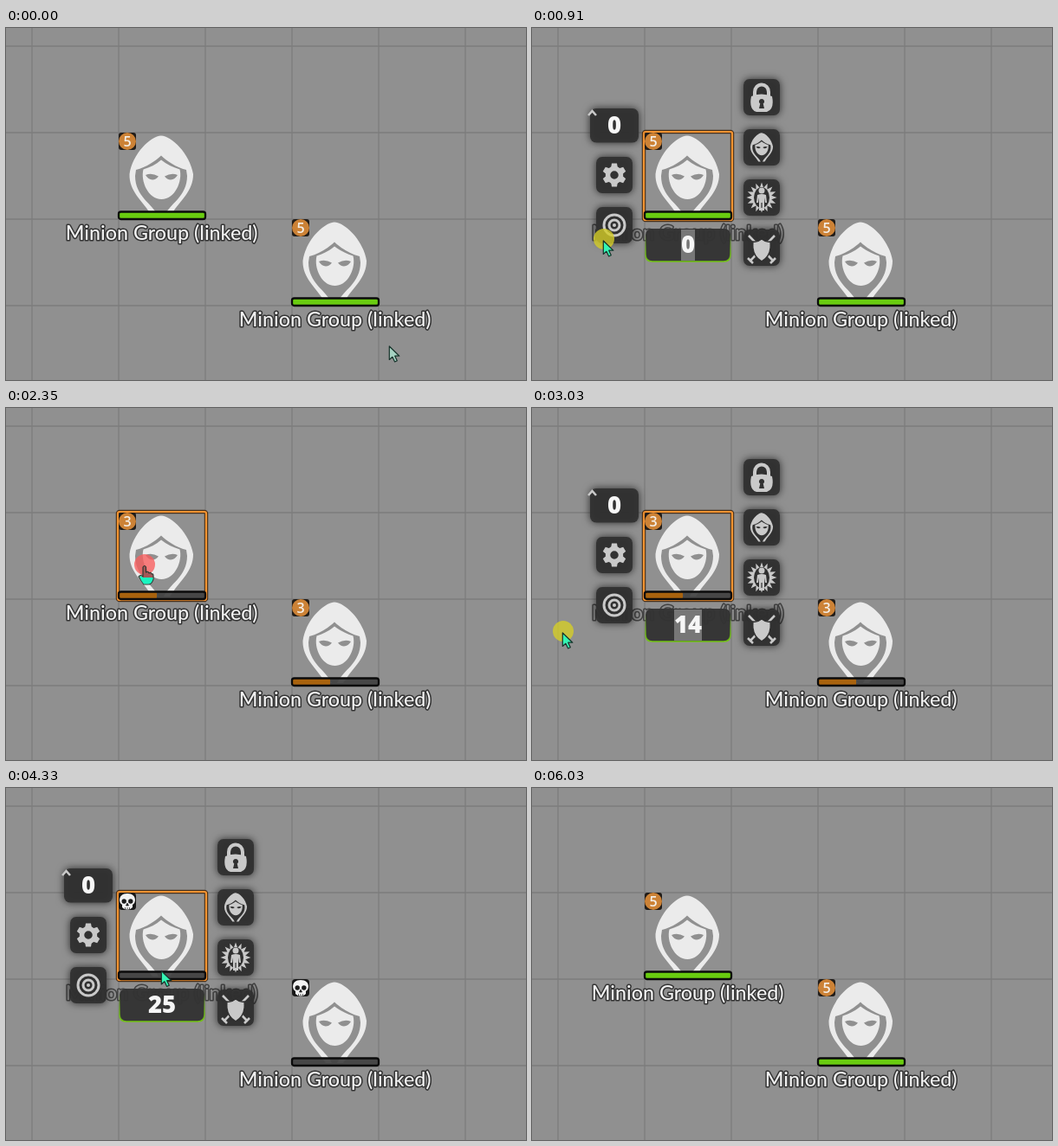
Recreate the animation shown at these times as an HTML page. Size 600 by 407 pixels, loop 6300 ms.

```html
<!DOCTYPE html>
<html lang="en">
<head>
<meta charset="utf-8">
<title>Minion group tokens</title>
<style>
html, body { margin: 0; width: 100%; height: 100%; overflow: hidden; background: #909090; }
svg { display: block; width: 600px; height: 407px; }
text { text-anchor: middle; }
.label { font: 500 23.3px Lato, sans-serif; fill: #f2f2f2; stroke: #333; stroke-width: 3px; stroke-linejoin: round; paint-order: stroke; }
.label.dim { fill: #8b8b8b; stroke: #343434; opacity: .85; }
.num { font: 800 27.5px "Open Sans", sans-serif; fill: #f6f6f6; }
.count { font: 600 16px "Open Sans", sans-serif; fill: #f4efe8; }
.btn { fill: #303030; fill-opacity: .93; filter: url(#shade); }
.icon { fill: #c9c9c9; }
.line { fill: none; stroke: #c9c9c9; }
</style>
</head>
<body>
<svg id="stage" viewBox="0 0 600 407" xmlns="http://www.w3.org/2000/svg">
  <defs>
    <filter id="shade" x="-50%" y="-50%" width="200%" height="200%">
      <feDropShadow dx="0" dy="0" stdDeviation="5" flood-color="#000" flood-opacity=".75"/>
    </filter>
    <linearGradient id="rim" x1="0" y1="0" x2="0" y2="1">
      <stop offset="0" stop-color="#6dbd10" stop-opacity="0"/>
      <stop offset=".5" stop-color="#6dbd10" stop-opacity=".55"/>
      <stop offset="1" stop-color="#72c412"/>
    </linearGradient>
    <path id="hood" fill-rule="evenodd" d="M49 3.500C37 4 16 24 12.500 48C12 68 27 78 36 93L39 97H46C39 82 19 74 19 50L20 43C32 40 42 33 49 26.500C56 33 66 40 78 43L79 50C79 74 59 82 52 97H59L62 93C71 78 86 68 86 48C82 24 61 4 49 3.500ZM49 31.500C43 37 36 40 28.500 42.500C25 56 34 77 49.500 77C65 77 74 56 70.500 42.500C63 40 56 37 49 31.500ZM31 49Q38 46 46 50.500Q43 54.500 39 54.500Q34 54 31 49ZM68 49Q61 46 53 50.500Q56 54.500 60 54.500Q65 54 68 49Z"/>
    <g id="skull">
      <rect x="0" y="0" width="20" height="20" rx="4" fill="#171717"/>
      <path fill="#f2f2f2" d="M10 1C4 1 1 4 1 9Q1 12 4 14V17Q7 20 10 19.500Q13 20 16 17V14Q19 12 19 9C19 4 16 1 10 1Z"/>
      <circle cx="6.200" cy="10" r="2.700" fill="#1a1a1a"/><circle cx="13.800" cy="10" r="2.700" fill="#1a1a1a"/>
      <path d="M10 12l-1.500 3h3zM7.500 17v2M10 17v2M12.500 17v2" fill="#1a1a1a" stroke="#1a1a1a" stroke-width=".7"/>
    </g>
  </defs>
  <rect width="600" height="407" fill="#909090"/>
  <path id="grid" stroke="#000" stroke-opacity=".14" stroke-width="1.300"/>
  <g id="tokens"></g>
  <g id="hud">
    <g id="buttons"></g>
    <path class="line" stroke-width="2.600" d="M65 101l4.500-5 4.500 5"/>
    <text class="num" x="95" y="122">0</text>
    <g id="gear" class="icon" transform="translate(95 170)"></g>
    <g transform="translate(95 228)">
      <circle class="line" r="12" stroke-width="3"/><circle class="line" r="6" stroke-width="3"/><circle class="icon" r="2"/>
    </g>
    <path class="line" stroke-width="4" d="M257 80v-6a8 8.500 0 0 1 16 0v6"/>
    <path class="icon" fill-rule="evenodd" d="M253 79Q265 74 277 79Q280 94 271 97H259Q250 94 253 79ZM265 82a3 3 0 0 0-1.700 5.500L262 93h6l-1.300-5.500A3 3 0 0 0 265 82Z"/>
    <use href="#hood" class="icon" transform="translate(247.500 120) scale(.355)"/>
    <g transform="translate(265 196)">
      <path id="aura" class="icon"/>
      <ellipse rx="9" ry="12" fill="#303030"/>
      <circle class="icon" cy="-8" r="3.500"/>
      <path class="icon" d="M-5-3Q0-5 5-3L6 6H4L3 0V15H.6V6H-.6V15H-3V0L-4 6H-6Z"/>
    </g>
    <g transform="translate(265 255)">
      <path class="line" stroke-width="2.600" d="M-15-15L14 15M15-15L-14 15M-16 11l6 6M16 11l-6 6"/>
      <path class="icon" stroke="#303030" stroke-width="1.500" d="M0-11Q5-7 10-8Q12 8 0 15Q-12 8-10-8Q-5-7 0-11Z"/>
    </g>
    <rect x="131" y="232" width="98" height="38" rx="7" fill="#323232" fill-opacity=".96"/>
    <path d="M131 238v24q0 8 8 8h82q8 0 8-8v-24" fill="none" stroke="url(#rim)" stroke-width="1.700"/>
    <rect id="pick" y="233" height="36" fill="#777"/>
    <text id="value" class="num" x="180" y="260"></text>
    <path id="caret" stroke="#fff" stroke-width="1.200"/>
  </g>
  <g id="pointer">
    <circle id="press" cy="-2" r="12"/>
    <path id="arrow" stroke="#17332b" stroke-width="1.200" stroke-linejoin="round" d="M-.7 0V15.500L2.900 12.300L5.600 18L8.300 16.700L5.700 11.200H10.800Z"/>
    <g id="hand" stroke="#26352f" stroke-width="1.100" stroke-linejoin="round">
      <path fill="#a35757" d="M-2 1Q0-2 1.500 1V7Q4 5 5 8Q7 6 8 9Q10 8 10 11V15Q8 21 4 21H-1Q-4 17-7 12Q-5 9-2 12Z"/>
      <path fill="#19f5c0" stroke="none" d="M-6 12Q-4 10-2 13H9.500V15Q8 20.500 4 20.500H-1Q-4 17-6 12Z"/>
    </g>
  </g>
</svg>
<script>
const LOOP = 6300, STEPS = 48;
const $ = id => document.getElementById(id);
const set = (el, attrs) => { for (const a in attrs) el.setAttribute(a, attrs[a]); };
const show = (el, on) => set(el, { visibility: on ? "inherit" : "hidden" });
const within = (k, ...spans) => spans.some(([a, b]) => k >= a && k <= b);

let lines = "";
for (let x = 30; x < 600; x += 100) lines += `M${x} 0V407`;
for (let y = 21; y < 407; y += 100) lines += `M0 ${y}H600`;
set($("grid"), { d: lines });

const token = (x, y) => `<g transform="translate(${x} ${y})">
  <use href="#hood" fill="#ebebeb"/>
  <g class="frame" fill="none"><rect x="-1" y="-1" width="102" height="102" rx="2" stroke="#49311b" stroke-width="4.500"/>
  <rect x="-1" y="-1" width="102" height="102" rx="2" stroke="#f59432" stroke-width="2.200"/></g>
  <g class="alive"><rect x="0" y="0" width="20" height="20" rx="3" fill="#201c19"/>
  <circle cx="10" cy="10" r="10" fill="#cc8236"/><text class="count" x="10" y="16"></text></g>
  <use href="#skull" class="dead"/>
  <rect x="0" y="91.500" width="100" height="8.500" rx="2.500" fill="#424242" fill-opacity=".93"/>
  <rect class="hp" x="0" y="91.500" height="8.500" rx="2"/>
  <rect x="0" y="91.500" width="100" height="8.500" rx="2.500" fill="none" stroke="#0b0b0b" stroke-width="2.300"/>
  <text class="label" x="49.700" y="124.300">Minion Group (linked)</text></g>`;
$("tokens").innerHTML = token(130, 121) + token(330, 221);
const tokens = [...$("tokens").children];

const button = (x, y, w = 42, h = 42) => `<rect class="btn" x="${x}" y="${y}" width="${w}" height="${h}" rx="7"/>`;
$("buttons").innerHTML = button(67, 93, 56, 39.5) + button(74, 149) + button(74, 207) +
  [0, 1, 2, 3].map(i => button(244, 59 + i * 58)).join("");

let teeth = "";
for (let i = 0; i < 6; i++) teeth += `<path d="M-4-8L-3-13.500H3L4-8Z" transform="rotate(${i * 60})"/>`;
$("gear").innerHTML = teeth + '<circle class="line" r="7.500" stroke-width="5.500"/>';

let rays = "";
for (let i = 0; i < 32; i++) {
  const a = i * Math.PI / 16, r = i % 2 ? 11.5 : 17.5;
  rays += (i ? "L" : "M") + (r * Math.sin(a)).toFixed(1) + " " + (-r * Math.cos(a)).toFixed(1);
}
set($("aura"), { d: rays + "Z" });

// Pointer path: step, x, y
const path = [
  [0, 443, 368], [3, 161, 183], [4, 170, 205], [5, 200, 236], [6, 225, 252], [7, 83, 246], [9, 68, 251], [12, 68, 251],
  [14, 120, 390], [16, 163, 255], [18, 160, 183], [20, 215, 236], [21, 222, 256], [22, 135, 257], [23, 36, 260], [26, 36, 272],
  [28, 45, 268], [29, 60, 262], [32, 160, 183], [34, 200, 240], [36, 222, 256], [38, 118, 290], [41, 150, 290],
  [43, 420, 340], [44, 567, 359], [48, 567, 359]
];
function locate(k) {
  const i = path.findIndex(p => p[0] > k), [a, x, y] = path[i - 1], [b, u, v] = path[i];
  const f = (k - a) / (b - a);
  return [x + (u - x) * f, y + (v - y) * f];
}

function drawTokens(k, open) {
  const hp = k < 13 || k >= 41 ? 25 : k < 27 ? 11 : 0;
  tokens.forEach((t, i) => {
    const part = name => t.querySelector("." + name);
    show(part("frame"), i === 0 && k >= 4 && k < 45);
    show(part("alive"), hp > 0);
    show(part("dead"), hp === 0);
    part("count").textContent = Math.ceil(hp / 5);
    set(part("hp"), { width: hp * 4, fill: hp === 25 ? "#69cc10" : "#a9630e" });
    part("label").classList.toggle("dim", open && i === 0);
  });
}

function drawHud(k, open) {
  show($("hud"), open);
  const value = k < 12 || k >= 39 ? "0" : k < 25 ? "14" : "25";
  const width = value.length * 16;
  $("value").textContent = value;
  set($("pick"), { x: 180 - width / 2, width });
  show($("pick"), open && within(k, [7, 11], [22, 24], [37, 38]));
  set($("caret"), { d: `M${180.5 + width / 2} 233V269` });
  show($("caret"), open && within(k, [12, 12], [25, 26], [39, 40]));
}

function drawPointer(k) {
  const [x, y] = locate(k);
  const right = within(k, [3, 3], [18, 18], [32, 32]);
  const left = within(k, [6, 7], [21, 23], [36, 37], [44, 44]);
  set($("pointer"), { transform: `translate(${x} ${y})` });
  show($("pointer"), !within(k, [11, 12], [25, 26], [39, 40], [46, 47]));
  show($("press"), left || right);
  set($("press"), { fill: right ? "#f95c5c" : "#d5cd28", "fill-opacity": right ? .78 : .8 });
  show($("hand"), right);
  show($("arrow"), !right);
  set($("arrow"), { fill: k === 0 ? "#a5d2c2" : "#35f5b3" });
}

function draw(ms) {
  const k = Math.floor((ms % LOOP + 15) / (LOOP / STEPS)) % STEPS;
  const open = within(k, [4, 12], [19, 26], [33, 40]);
  drawTokens(k, open);
  drawHud(k, open);
  drawPointer(k);
}

const start = performance.now();
function tick() {
  draw(performance.now() - start);
  requestAnimationFrame(tick);
}
tick();
</script>
</body>
</html>
```
